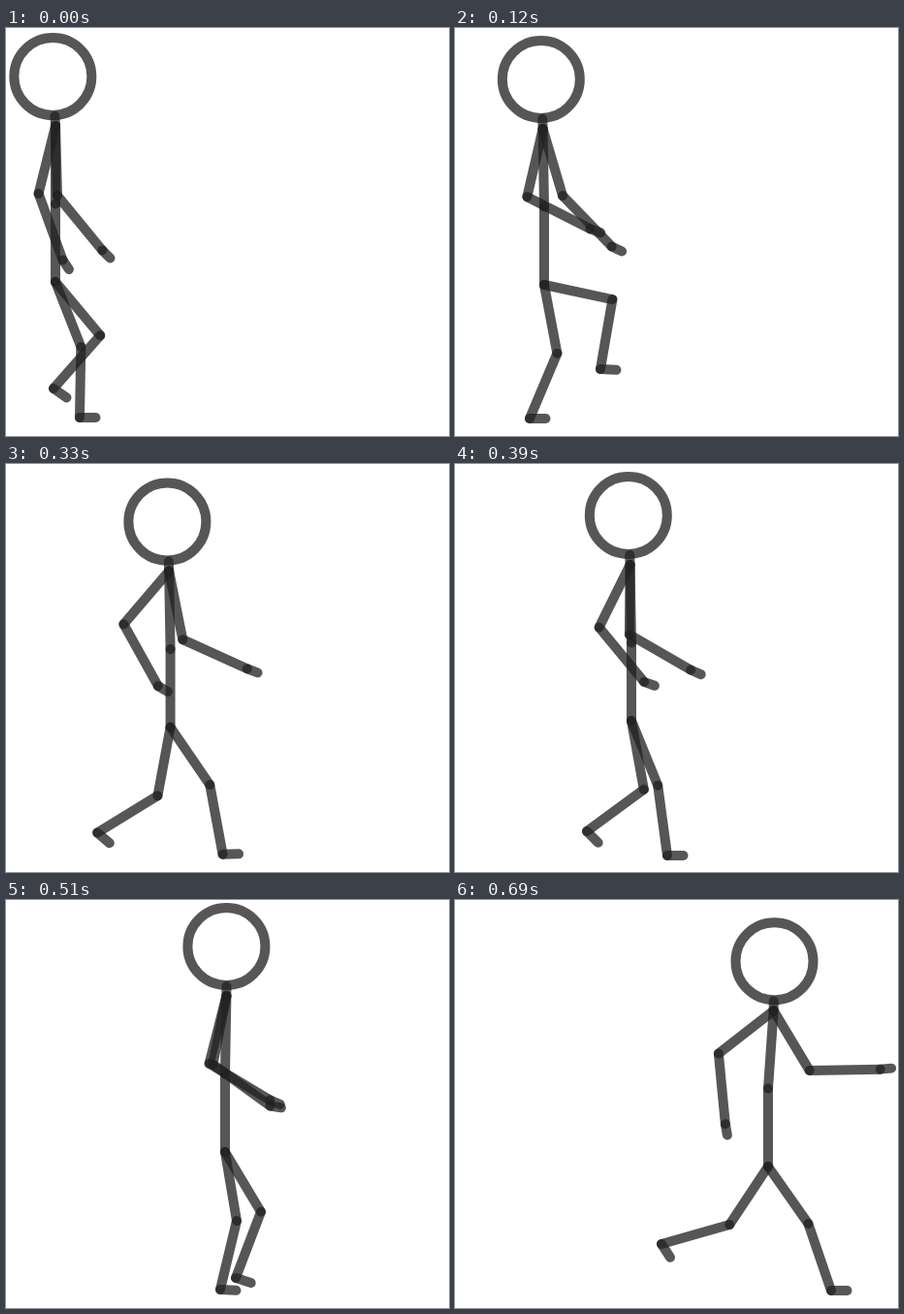
Write an HTML page that moves like this. It is 457 px wide and 421 px high and loops after 0.87 s.

```html
<!DOCTYPE html>
<html lang="en">
<head>
<meta charset="utf-8">
<title>Running stick figure</title>
<style>
  html, body { margin: 0; width: 100%; height: 100%; overflow: hidden; background: #fff; }
  svg { display: block; width: 457px; height: 421px; }
  line, circle { fill: none; stroke: #222; stroke-opacity: .76; stroke-width: 10; stroke-linecap: round; }
</style>
</head>
<body>
<svg id="stage" viewBox="0 0 457 421"></svg>
<script>
const LOOP = 870, STEP = 30, LAST = 23;
const SPINE = 80.5, NECK = 10, HEAD = 41, UPPER = 72, FORE = 73, HAND = 11.5;
const THIGH = 72, SHIN = 73, FOOT = 16.5;

// Pose times in steps; angles are degrees from straight down, positive to the right.
const keys = [0, 4, 8, 13, 17, 20, 23];
const body = {
  x: [51, 92, 151, 182, 226, 288, 323],
  y: [262, 265, 280, 265, 260, 277, 275],
  lean: [0, -1, -1, -1, 1, 3, 4],
  nod: [-3, -2, -2, -2, 0, 1, 1]
};
const arms = [
  { upper: [-14, 16.5, 24.7, -.5, -14.3, -34.5, -52],
    fore: [20, 44, 75, 60, 59, 58.5, 5.5],
    hand: [34, 65, 76, 66, 67, 66, 10] },
  { upper: [1.6, -13, -57, -26.3, -11.2, 14.3, 31],
    fore: [39.4, 63, 18, 39.5, 54, 73, 91],
    hand: [45, 70, 48, 70, 81, 99, 95] }
];
const legs = [
  { x: [76, 77, 57, 136, 237, 382, 388],
    y: [402, 403, 386, 379, 390, 377, 403],
    foot: [90, 90, 65, 45, 72, 119, 90] },
  { x: [49, 150, 232, 219, 221, 221, 213],
    y: [372, 352, 397, 404, 402, 401, 355],
    foot: [55, 87, 93, 90, 87, 79, 33] }
];

const stage = document.getElementById('stage');
const make = tag => stage.appendChild(document.createElementNS('http://www.w3.org/2000/svg', tag));
const set = (el, attrs) => { for (const k in attrs) el.setAttribute(k, attrs[k].toFixed(2)); };
const head = make('circle');
const bones = Array.from({ length: 15 }, () => make('line'));

const slope = (v, i) => (v[i + 1] - v[i]) / (keys[i + 1] - keys[i]);

function tangent(v, i) {
  if (i === 0) return slope(v, 0);
  if (i === keys.length - 1) return slope(v, i - 1);
  const a = slope(v, i - 1), b = slope(v, i);
  return a * b > 0 ? 2 * a * b / (a + b) : 0;
}

// Cubic curve through the poses that never overshoots them.
function at(v, n) {
  let i = 0;
  while (i < keys.length - 2 && n >= keys[i + 1]) i++;
  const w = keys[i + 1] - keys[i], u = (n - keys[i]) / w, r = 1 - u;
  return v[i] * r * r * (1 + 2 * u) + v[i + 1] * u * u * (3 - 2 * u)
    + w * u * r * (r * tangent(v, i) - u * tangent(v, i + 1));
}

function reach([x, y], deg, len) {
  const a = deg * Math.PI / 180;
  return [x + len * Math.sin(a), y + len * Math.cos(a)];
}

// Knee position for a given hip and ankle, bending forwards.
function kneeOf([hx, hy], [ax, ay]) {
  const dx = ax - hx, dy = ay - hy, d = Math.hypot(dx, dy);
  const along = (d * d + THIGH * THIGH - SHIN * SHIN) / (2 * d);
  const out = Math.sqrt(Math.max(0, THIGH * THIGH - along * along));
  return [hx + (dx * along + dy * out) / d, hy + (dy * along - dx * out) / d];
}

function draw(n) {
  let used = 0;
  const chain = (...pts) => {
    for (let i = 1; i < pts.length; i++) {
      const [x1, y1] = pts[i - 1], [x2, y2] = pts[i];
      set(bones[used++], { x1, y1, x2, y2 });
    }
  };
  const hip = [at(body.x, n), at(body.y, n)];
  const waist = reach(hip, 180, SPINE);
  const chest = reach(waist, 180 - at(body.lean, n), SPINE);
  const tilt = 180 - at(body.nod, n);
  const neck = reach(chest, tilt, NECK);
  const [cx, cy] = reach(neck, tilt, HEAD);
  set(head, { cx, cy, r: 40 });
  chain(hip, waist, chest, neck);

  for (const arm of arms) {
    const elbow = reach(chest, at(arm.upper, n), UPPER);
    const wrist = reach(elbow, at(arm.fore, n), FORE);
    chain(chest, elbow, wrist, reach(wrist, at(arm.hand, n), HAND));
  }
  for (const leg of legs) {
    const ankle = [at(leg.x, n), at(leg.y, n)];
    chain(hip, kneeOf(hip, ankle), ankle, reach(ankle, at(leg.foot, n), FOOT));
  }
}

function tick() {
  draw(Math.min(LAST, Math.floor(performance.now() % LOOP / STEP)));
  requestAnimationFrame(tick);
}
tick();
</script>
</body>
</html>
```
